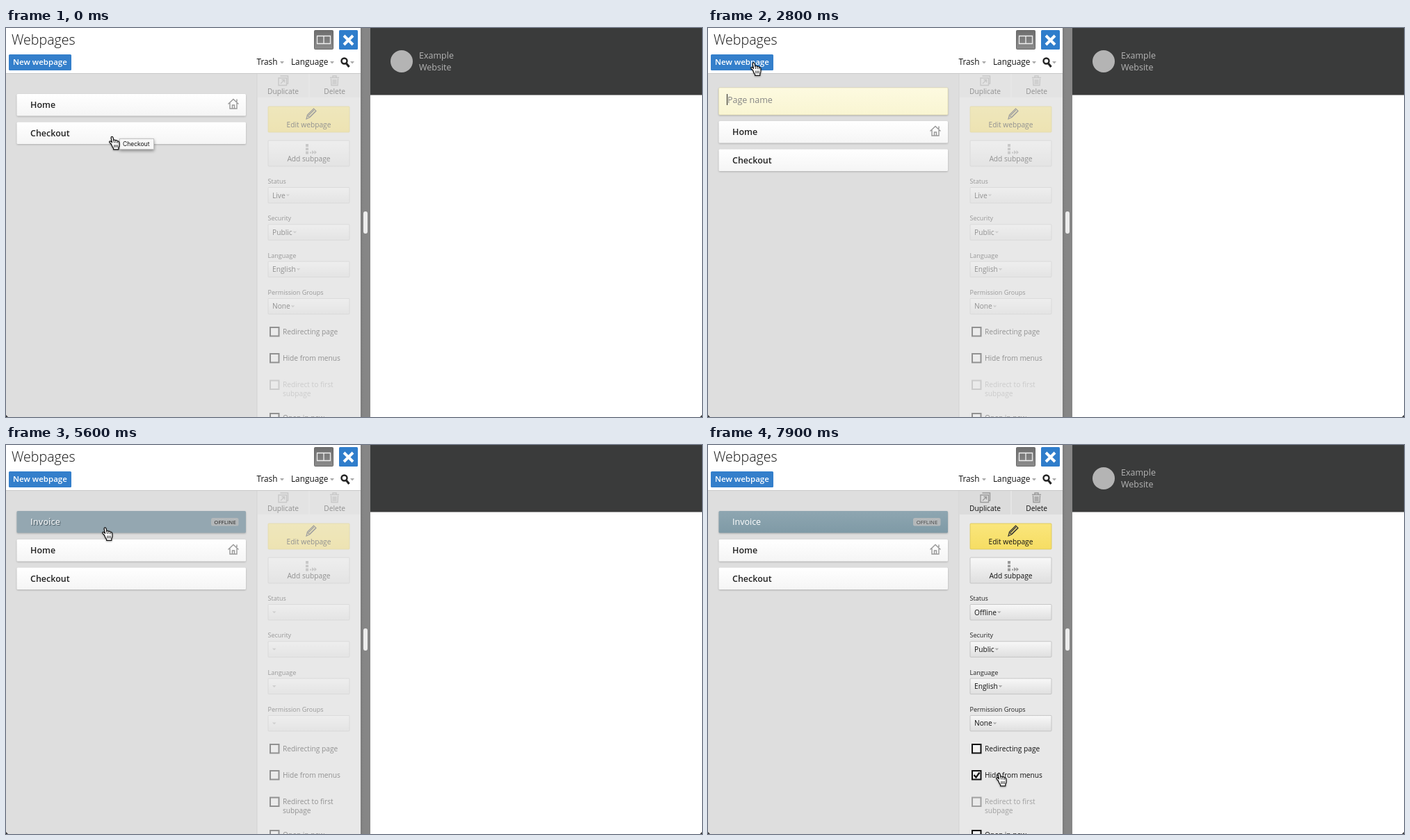
These frames come from a looping animation (1001x560 px, 8000 ms). An HTML page:

```html
<!DOCTYPE html>
<html lang="en">
<head>
<meta charset="utf-8">
<title>Webpages</title>
<style>
  html, body { margin: 0; width: 100%; height: 100%; overflow: hidden; background: #fff; }
  svg { display: block; width: 1001px; height: 560px; }
  text { font: 10.2px "Open Sans", sans-serif; fill: #111; white-space: pre; }
  .title { font-size: 19.6px; font-weight: 300; }
  .menu { font-size: 11.8px; }
  .action { font-size: 11.5px; font-weight: 600; fill: #fff; }
  .row text { font-size: 12.5px; font-weight: 600; fill: #222; }
  .row .badge { font-size: 7.8px; fill: #444; }
  .row.lit .name { fill: #fff; text-shadow: 1px 1px 1px #34434c; }
  .row.plain text { font-weight: 400; text-shadow: none !important; }
  .entry { font-size: 12.5px; }
  .label { font-size: 9.05px; fill: #222; }
  .mid { text-anchor: middle; }
  .brand { font-size: 12.5px; fill: #b4b4b4; }
  .tip { font: 8.5px Inter, sans-serif; }
  .icon { fill: none; stroke: #999; stroke-width: 1.4; }
  .lift { filter: drop-shadow(0 1px 1px rgba(0,0,0,.22)); }
</style>
</head>
<body>
<svg viewBox="0 0 1001 560" xmlns="http://www.w3.org/2000/svg">
  <defs>
    <linearGradient id="paper" x2="0" y2="1"><stop stop-color="#fff"/><stop offset="1" stop-color="#f5f5f5"/></linearGradient>
    <linearGradient id="slate" x2="0" y2="1"><stop stop-color="#8ea6b1"/><stop offset="1" stop-color="#7f9aa6"/></linearGradient>
    <linearGradient id="field" x2="0" y2="1"><stop stop-color="#f8f8f8"/><stop offset="1" stop-color="#dfdfdf"/></linearGradient>
    <linearGradient id="gold" x2="0" y2="1"><stop stop-color="#fae67c"/><stop offset="1" stop-color="#f6dd63"/></linearGradient>
    <linearGradient id="cream" x2="0" y2="1"><stop stop-color="#fdfae0"/><stop offset="1" stop-color="#f9f5d2"/></linearGradient>
    <linearGradient id="grey" x2="0" y2="1"><stop stop-color="#6e6e6e"/><stop offset="1" stop-color="#8c8c8c"/></linearGradient>
    <linearGradient id="bar"><stop stop-color="#7b7b7b"/><stop offset=".3" stop-color="#868686"/><stop offset="1" stop-color="#868686"/></linearGradient>
  </defs>

  <rect width="1001" height="560" fill="#fff"/>
  <rect y="65" width="361" height="495" fill="#dedede"/>
  <rect x="361" y="65" width="149" height="495" fill="#e8e8e8"/>
  <path d="M361 66V560" stroke="#d2d2d2"/>

  <g id="sidebar"></g>
  <g id="rows"></g>

  <g id="form">
    <rect class="lift" x="15.5" y="86" width="329.500" height="39" rx="1.5" fill="url(#cream)" stroke="#e2dcae" stroke-width=".6"/>
    <text id="entry" class="entry" x="27" y="108"></text>
    <path id="caret" d="M0 95V111" stroke="#222"/>
  </g>

  <g id="loader" fill="#a5b4be">
    <circle id="disc" cx="261" cy="355"/>
    <circle cx="277" cy="336" r="2" fill="#999"/>
  </g>

  <rect width="510" height="65" fill="#fff"/>
  <path d="M0 65.500H510" stroke="#c8c8c8"/>
  <text class="title" x="8" y="24.300">Webpages</text>
  <rect x="4" y="38" width="90" height="23" rx="1.5" fill="#347fcb"/>
  <text class="action" x="10" y="53">New webpage</text>
  <text class="menu" x="360.500" y="53">Trash</text>
  <text class="menu" x="410" y="53">Language</text>
  <path d="M394 48h6l-3 3.500zM466 48h6l-3 3.500zM495 48h6l-3 3.500z" fill="#aaa"/>
  <circle cx="486.500" cy="47.500" r="4" fill="none" stroke="#222" stroke-width="2.400"/>
  <path d="M489.500 51l4 5" stroke="#222" stroke-width="3"/>
  <rect x="443.500" y="3.500" width="27" height="27" rx="1" fill="url(#grey)" stroke="#666"/>
  <path d="M447.500 11.500h19v11h-19zM457 11.500v11" fill="none" stroke="#eee" stroke-width="1.300"/>
  <rect x="479" y="3" width="27" height="28" rx="1.500" fill="#2f7dcb"/>
  <path d="M486 11l13 13M499 11l-13 13" stroke="#fff" stroke-width="4"/>

  <rect x="510" width="14" height="560" fill="url(#bar)"/>
  <rect x="514" y="264" width="6" height="32" rx="3" fill="#ececec"/>
  <rect x="524" width="477" height="96.500" fill="#3a3b3b"/>
  <g id="brand">
    <circle cx="569" cy="48" r="16" fill="#b4b4b4"/>
    <text class="brand" x="594" y="44">Example</text>
    <text class="brand" x="594" y="61">Website</text>
  </g>
  <path d="M0 557v3h3zM1001 557v3h-3z" fill="#333"/>

  <g id="tip">
    <rect x="163.500" y="159.500" width="49" height="15" fill="#f7f7f7" stroke="#c4c4c4" style="filter:drop-shadow(0 2px 2px rgba(0,0,0,.4))"/>
    <text class="tip" x="168" y="170.300">Checkout</text>
  </g>
  <g id="hand" style="filter:drop-shadow(0 1px 1px rgba(0,0,0,.35))">
    <path d="M3.600 12L1.200 9.300Q.3 8.200 1.300 7.500Q2.300 7 3.300 8L4.600 9.300L3.200 2.800Q3 1.100 4.300.9Q5.500.8 5.900 2.200L7 6.500Q7.200 5.400 8.400 5.500Q9.600 5.600 9.800 6.800Q10.300 6 11.300 6.300Q12.300 6.600 12.500 7.700Q13.200 7.100 14 7.700Q14.900 8.300 14.900 9.800L15 13Q15 15 13.800 16.800V19.400H6.600V17.800Q4.600 15.400 3.600 12Z" fill="#fff" stroke="#111" stroke-width="1.200" stroke-linejoin="round"/>
    <path d="M7 6.500l.7 3.500M9.800 6.800l.5 3.400M12.500 7.700l.2 2.700M7.800 12.500v4M10 12.500v4M12.200 12.500v4" fill="none" stroke="#111" stroke-width=".9"/>
  </g>
</svg>
<script>
const $ = id => document.getElementById(id);
const show = (id, on) => $(id).style.display = on ? '' : 'none';

const field = (label, i) => {
  const y = 229.5 + i * 53.3;
  return `<text class="label" x="376.500" y="${y - 5.5}">${label}</text>
    <rect x="377" y="${y}" width="117" height="22.500" rx="1" fill="url(#field)" stroke="#bbb" stroke-width=".8"/>
    <text class="value" x="383" y="${y + 15}"></text>
    <path class="arrow" d="M0 ${y + 10}h5.500l-2.750 2.800z" fill="#aaa"/>`;
};

const check = (id, y, ...lines) => `<g id="${id}">
  <rect x="380" y="${y}" width="12.500" height="12.500" fill="#f1f1f1" stroke="#111" stroke-width="2"/>
  ${lines.map((line, i) => `<text x="398" y="${y + 9.5 + i * 12.5}">${line}</text>`).join('')}</g>`;

$('sidebar').innerHTML = `
  <path d="M361.500 66H510V100H361.500z" fill="#dcdcdc"/>
  <path d="M436 66V100" stroke="#eee"/>
  <path class="icon" d="M394.500 69h11v11h-2M392 72h11.500v10.500H392zM395 80l5-5M396.500 74.500h4v4"/>
  <path class="icon" d="M466 71.500h13M470 71v-2h5v2M467.500 73l.5 9.500h9l.5-9.500M470.500 74v7M472.500 74v7M474.500 74v7"/>
  <text class="mid" x="398.500" y="94.500">Duplicate</text>
  <text class="mid" x="472.700" y="94.500">Delete</text>
  <rect x="377" y="113" width="117" height="37" rx="1" fill="url(#gold)" stroke="#d8c458" stroke-width=".8"/>
  <path d="M432 131l1.500-6 9-9 3.500 3.500-9 9zM435 126l8-8M437 128l8-8M433 125.500l4 3.500" fill="none" stroke="#333" stroke-width="1.200"/>
  <text class="mid" x="435.500" y="142.500">Edit webpage</text>
  <rect x="377" y="162" width="117" height="37" rx="1" fill="url(#field)" stroke="#bbb" stroke-width=".8"/>
  <path d="M431 167h4v4h-4zM431 172.500h4v3.500h-4zM431 177.500h4v4h-4zM437 178.500h2v2h-2zM440 176l3.500 3-3.500 3zM443.500 176l3.500 3-3.500 3z" fill="#999"/>
  <text class="mid" x="435.500" y="191.500">Add subpage</text>
  ${['Status', 'Security', 'Language', 'Permission Groups'].map(field).join('')}
  ${check('redirecting', 431, 'Redirecting page')}
  ${check('hide', 469, 'Hide from menus')}
  ${check('first', 507.5, 'Redirect to first', 'subpage')}
  ${check('window', 555, 'Open in new')}
  <path id="tick" d="M382.500 475l3 3.500 5-7" fill="none" stroke="#111" stroke-width="2.200"/>`;

const row = (id, name, extra = '') => `<g id="${id}" class="row">
  <rect class="card lift" x="15.500" width="329.500" height="31.500" rx="1.500" fill="url(#paper)"/>
  <text class="name" x="35" y="20.300">${name}</text>${extra}</g>`;

$('rows').innerHTML =
  row('invoice', 'Invoice', `<rect x="295" y="10" width="39.500" height="11.500" rx="2.500" fill="#b4b8ba"/>
    <text class="badge mid" x="315" y="18.700">OFFLINE</text>`) +
  row('home', 'Home', '<path class="icon" d="M319.500 14.500l7.500-7 7.500 7M332 11V7.500M322 13v8h10v-8M325.500 21v-5h3v5"/>') +
  row('checkout', 'Checkout');

const place = (id, y) => $(id).setAttribute('transform', `translate(0 ${y})`);
const values = [...document.querySelectorAll('.value')];
const arrows = [...document.querySelectorAll('.arrow')];

function setFields(status) {
  const names = status ? [status, 'Public', 'English', 'None'] : ['', '', '', ''];
  values.forEach((el, i) => {
    if (el.textContent !== names[i]) el.textContent = names[i];
    const x = 383 + (names[i] ? el.getComputedTextLength() + 1 : 0);
    arrows[i].setAttribute('transform', `translate(${x} 0)`);
  });
}

// Cursor moves: start time, end time, destination
const moves = [
  [300, 1200, 64, 52], [1200, 1400, 61, 49], [4700, 5300, 138, 118],
  [5900, 6800, 415, 484], [6900, 7100, 414, 481], [7600, 7900, 414, 471.5]
];

function handAt(t) {
  let x = 148, y = 155.5;
  for (const [from, to, endX, endY] of moves) {
    const p = Math.min(1, Math.max(0, (t - from) / (to - from)));
    const k = p * p * (3 - 2 * p);
    x += (endX - x) * k;
    y += (endY - y) * k;
  }
  return [x, y];
}

// Typing: time, letters shown
const typing = [[3000, 1], [3100, 2], [3200, 3], [3400, 4], [3500, 5], [3600, 7]];

function render(t) {
  const editing = t >= 2800 && t < 4400;
  const created = t >= 4400;
  const selected = t >= 5600;
  const ready = t >= 6000;

  show('tip', t < 400);
  show('hand', t < 3000 || t >= 4800);
  $('hand').setAttribute('transform', `translate(${handAt(t)})`);

  place('invoice', 95);
  place('home', editing ? 134 : created ? 136 : 95);
  place('checkout', editing ? 174.5 : created ? 176.5 : 135.5);
  show('invoice', created);
  $('invoice').setAttribute('class', 'row' + (selected ? ' lit' : '') + (t >= 7700 ? ' plain' : ''));
  $('invoice').querySelector('.card').setAttribute('fill',
    selected ? (t < 5700 ? '#94a7b1' : 'url(#slate)') : 'url(#paper)');
  $('invoice').querySelector('.name').style.opacity = t >= 5600 && t < 5700 ? .8 : 1;

  show('form', editing);
  if (editing) {
    const typed = 'Invoice'.slice(0, typing.filter(([at]) => t >= at).reduce((_, s) => s[1], 0));
    const entry = $('entry');
    entry.textContent = typed || 'Page name';
    entry.style.fill = typed ? '#222' : '#858585';
    entry.setAttribute('x', typed ? 27 : 28);
    const end = typed ? entry.getComputedTextLength() + 1 : .5;
    $('caret').setAttribute('transform', `translate(${27 + end} 0)`);
    show('caret', t < 4100);
  }

  const loading = t >= 4100 && t < 4400;
  show('loader', loading);
  if (loading) $('disc').setAttribute('r', 17 * Math.sin(Math.PI * (t - 4050) / 300));

  $('sidebar').style.opacity = ready ? Math.min(1, .6 + (t - 6000) / 500) : .4;
  setFields(ready ? 'Offline' : created ? '' : 'Live');
  $('first').style.opacity = created && !ready ? 1 : .33;
  show('tick', t >= 7800);
  show('brand', t < 5600 || t >= 5700);
}

let start;
function tick(now) {
  start ??= now;
  render(Math.floor((now - start) % 8000 / 100) * 100);
  requestAnimationFrame(tick);
}
render(0);
requestAnimationFrame(tick);
</script>
</body>
</html>
```
